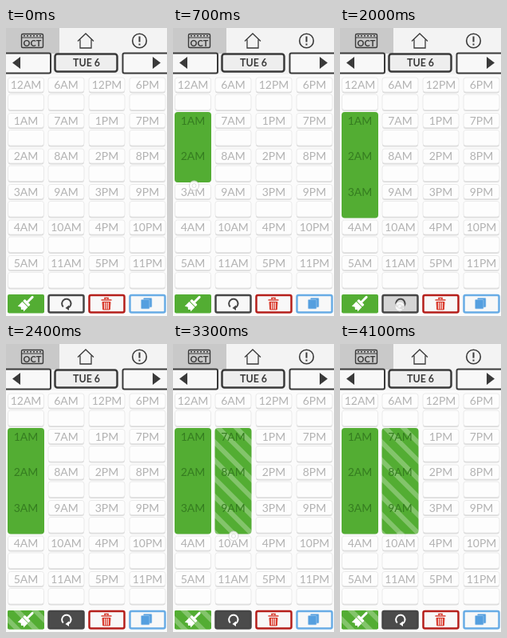
Recreate the animation shown at these times as an HTML page. Size 202 by 360 pixels, loop 4200 ms.

```html
<!DOCTYPE html>
<html>
<head>
<meta charset="utf-8">
<style>
  html, body { margin: 0; width: 100%; height: 100%; overflow: hidden; background: #fbfbfb; }
  svg { display: block; width: 100vw; height: 100vh; }
  text { font-family: Lato, "Open Sans", sans-serif; text-anchor: middle; }
  .hour { font-size: 14px; fill: #b2b2b2; }
  .dark { fill: none; stroke: #3a3a3a; }
</style>
</head>
<body>
<svg viewBox="0 0 202 360">
  <defs>
    <pattern id="stripes" width="16" height="16" patternUnits="userSpaceOnUse" patternTransform="translate(53 119.3) rotate(45)">
      <rect width="16" height="16" fill="#53ad33"/>
      <rect width="16" height="6" fill="#83c46b"/>
    </pattern>
  </defs>

  <!-- header -->
  <rect width="202" height="58" fill="#f3f3f3"/>
  <rect width="67" height="32" fill="#c9c9c9"/>
  <g class="dark">
    <rect x="19.5" y="7.5" width="27" height="17" rx="1.5" stroke-width="1.4"/>
    <path d="M20 12H46" stroke-width="1"/>
    <path d="M22 9.8H45" stroke-width="1.6" stroke-dasharray="2 2"/>
    <path d="M90 16.5L100 7L110 16.5M93 14.5V25H107V14.5" stroke-width="1.3"/>
    <circle cx="167.5" cy="16" r="8.8" stroke-width="1.6"/>
    <path d="M167.5 10.5V17.5M167.5 19.5V21.5" stroke-width="2"/>
  </g>
  <text x="33" y="23" font-size="11" font-weight="700" fill="#3a3a3a">OCT</text>
  <g fill="#f8f8f8" stroke="#3a3a3a" stroke-width="2">
    <rect x="-5" y="31.5" width="61" height="25" rx="2"/>
    <rect x="146.5" y="31.5" width="61" height="25" rx="2"/>
    <rect x="61.500" y="32.500" width="78" height="22" rx="3" fill="#eee" stroke-width="2.500"/>
  </g>
  <path d="M8 43.500L18 36V51ZM194 43.500L184 36V51Z" fill="#3a3a3a"/>
  <text x="101" y="47.7" font-size="12.4" font-weight="700" fill="#3a3a3a">TUE 6</text>

  <g id="cells"></g>
  <rect id="fill0" x="2" y="105" width="46" rx="4" fill="#53ad33"/>
  <rect id="fill1" x="52.500" y="105" width="46" rx="4" fill="url(#stripes)"/>
  <g id="labels"></g>

  <!-- toolbar -->
  <rect x="2" y="333" width="46" height="23.500" rx="2" fill="#53ad33"/>
  <rect id="brushStripes" x="2" y="333" width="46" height="23.500" rx="2" fill="url(#stripes)"/>
  <g transform="translate(25 344.5) rotate(45)" fill="#fff">
    <rect x="-1.5" y="-13" width="3" height="11" rx="1.5"/>
    <rect x="-5" y="-3" width="10" height="3.500" rx="1"/>
    <path d="M-5 1.500H5V9L3 7.500L1 9.500L-1.500 7.500L-5 9.500Z"/>
  </g>
  <rect id="repeat" x="53.500" y="334" width="44" height="21.500" rx="2" stroke="#464646" stroke-width="2.500"/>
  <g id="arrow">
    <path d="M71.800 348.500A5.700 5.700 0 1 1 78 349.700" fill="none" stroke="currentColor" stroke-width="2"/>
    <path d="M79 346.500V353L74.500 350Z" fill="currentColor"/>
  </g>
  <rect x="104.500" y="334" width="44" height="21.500" rx="2" fill="#f8f8f8" stroke="#b51f1b" stroke-width="2.500"/>
  <g fill="none" stroke="#d8392b">
    <path d="M119.500 340H132.500M124 339V337.500H128V339" stroke-width="1.600"/>
    <path d="M121 342.500H131L130.300 352H121.700Z" fill="#d8392b"/>
    <path d="M123.700 343V351.500M126 343V351.500M128.300 343V351.500" stroke="#fff" stroke-width="1"/>
  </g>
  <rect x="155.500" y="334" width="44" height="21.500" rx="2" fill="#f8f8f8" stroke="#68ace5" stroke-width="2.500"/>
  <g fill="#559fdf" stroke="#a9cfef" stroke-width=".6">
    <rect x="172.500" y="337.500" width="10.500" height="11.500" rx="1"/>
    <rect x="169.500" y="339.500" width="10.500" height="11.500" rx="1"/>
  </g>

  <g id="touch">
    <circle r="6" fill="#fff" fill-opacity=".82" stroke="#ccc" stroke-width=".8"/>
    <circle r="2.500" fill="none" stroke="#d8d8d8" stroke-width=".8"/>
  </g>
</svg>
<script>
const $ = id => document.getElementById(id);
const LOOP = 4200, STEP = 100, TOP = 105, ROW = 44.5;
const columns = [2, 52.5, 103.5, 154.5];

function panel(x, y, h) {
  return `<rect x="${x + .5}" y="${y + 1.5}" width="45" height="${h}" rx="3" fill="#dadada"/>
    <rect x="${x + .5}" y="${y + .5}" width="45" height="${h - .5}" rx="3" fill="#fdfdfd" stroke="#e6e6e6" stroke-width=".8"/>`;
}

let cells = '', labels = '';
columns.forEach((x, c) => {
  for (let r = 0; r < 6; r++) {
    const y = TOP + (r - 1) * ROW, hour = c * 6 + r;
    cells += panel(x, y + 22, 20) + panel(x, y + 1, 18.5);
    labels += `<text class="hour" x="${x + 23}" y="${y + 15.7}">${hour % 12 || 12}${hour < 12 ? 'AM' : 'PM'}</text>`;
  }
});
$('cells').innerHTML = cells;
$('labels').innerHTML = labels;
const texts = [...$('labels').children];

// Touch paths: [time, x, y, opacity]
const drags = [
  [[100, 25, 113, 1], [400, 25, 161, 1], [1000, 28, 233, 1], [1300, 28, 234, 0]],
  [[2000, 75, 348, 1], [2200, 75, 348, 1], [2400, 75, 348, 0]],
  [[2600, 82, 112, 1], [2800, 82, 122, 1], [3300, 76, 240, 1], [4300, 76, 240, 0]]
];

function locate(path, t) {
  if (t < path[0][0]) return null;
  for (let i = 1; i < path.length; i++) {
    const a = path[i - 1], b = path[i];
    if (t <= b[0]) {
      const k = (t - a[0]) / (b[0] - a[0]);
      return a.map((v, j) => v + (b[j] - v) * k);
    }
  }
  return path[path.length - 1];
}

// Half-hour slots are filled shortly after the touch passes them.
function paint(c, point) {
  let height = 0;
  for (let i = 0; i < 6; i++) {
    const base = (i >> 1) * ROW, half = i & 1;
    if (point && point[2] - 12 >= TOP + base + half * 20) height = base + (half ? 43.5 : 19);
  }
  $('fill' + c).setAttribute('height', height);
  for (let r = 1; r < 4; r++) {
    texts[c * 6 + r].style.fill = height > (r - 1) * ROW + 10 ? '#357c20' : '';
  }
}

function draw(now) {
  const t = Math.floor(now % LOOP / STEP) * STEP;
  const points = drags.map(p => locate(p, t));
  paint(0, points[0]);
  paint(1, points[2]);

  const press = t < 2000 ? 0 : Math.min(1, .2 + (t - 2000) / 400);
  const shade = Math.round(248 - 173 * press);
  $('repeat').setAttribute('fill', `rgb(${shade},${shade},${shade})`);
  $('arrow').style.color = press > .5 ? '#fff' : '#464646';
  $('brushStripes').setAttribute('opacity', press > .2 ? press : 0);

  const point = points.filter(Boolean).pop();
  $('touch').setAttribute('opacity', point ? point[3] : 0);
  if (point) $('touch').setAttribute('transform', `translate(${point[1]} ${point[2]})`);
}

const start = performance.now();
function frame() {
  draw(performance.now() - start);
  requestAnimationFrame(frame);
}
frame();
</script>
</body>
</html>
```
